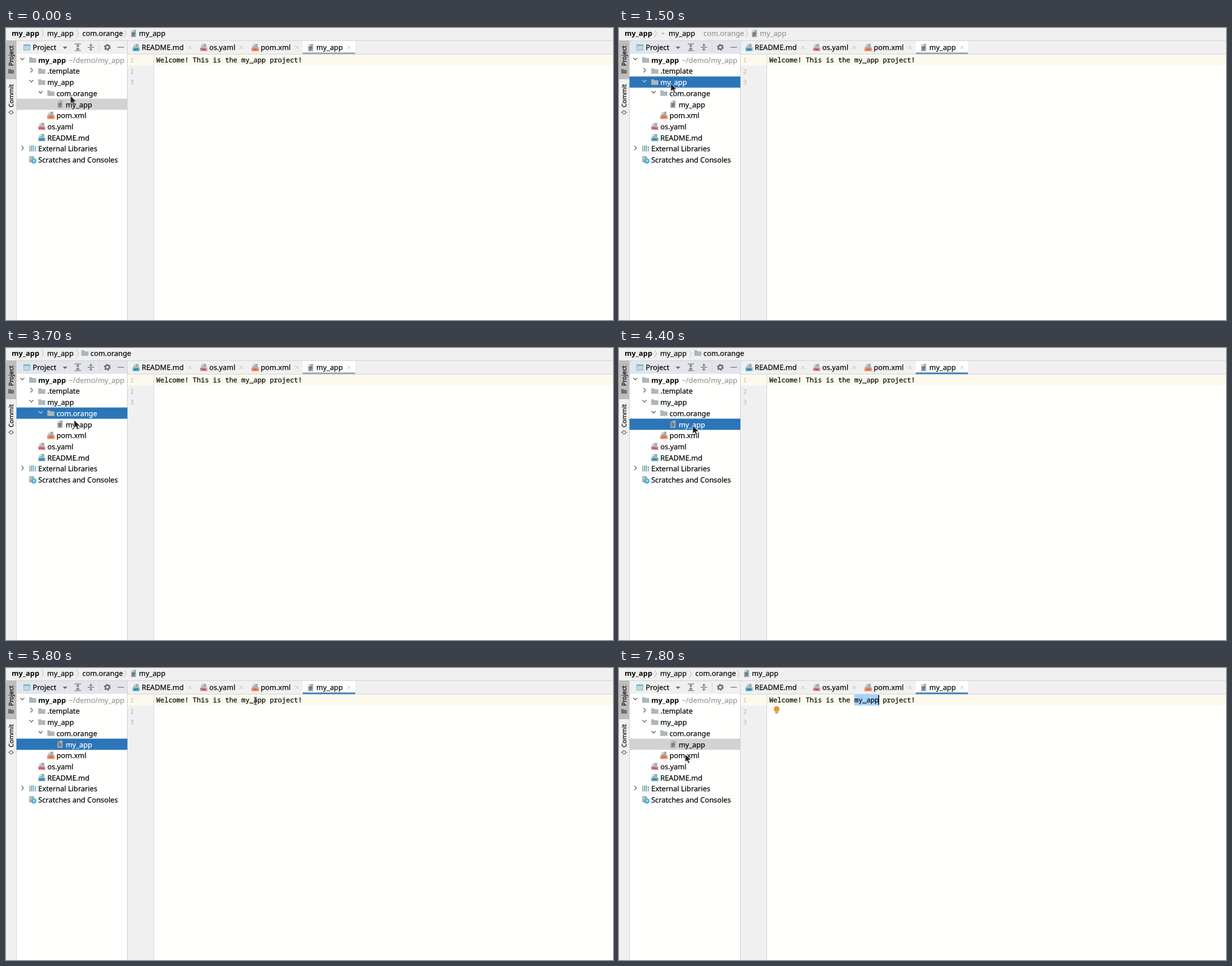
An HTML page that plays this animation: 1078 by 519 pixels, repeating every 8 s.

```html
<!DOCTYPE html>
<html lang="en">
<head>
<meta charset="utf-8">
<title>Project tree</title>
<style>
  html, body { margin: 0; width: 100%; height: 100%; overflow: hidden; background: #fff; }
  svg { display: block; width: 1078px; height: 519px; }
  text {
    font: 12.8px "Noto Sans", sans-serif; fill: currentColor; stroke: currentColor; stroke-width: .25;
    text-rendering: geometricPrecision; white-space: pre;
  }
  .bold { font-weight: 700; stroke: none; }
  .code { font: 12px "Noto Sans Mono", monospace; }
  .num { font: 10.5px "Noto Sans Mono", monospace; fill: #b0b0b0; stroke: none; }
  .side { font-size: 11.1px; }
  .tag { font-size: 5.4px; font-weight: 700; text-anchor: middle; stroke: none; }
  .line { fill: none; stroke: #6e6e6e; stroke-width: 1.2; }
  .sep { fill: none; stroke: #bcbcbc; }
</style>
</head>
<body>
<svg id="stage" viewBox="0 0 1078 519" color="#080808"></svg>
<script>
const LOOP = 8000, ROW = 19.72, BLUE = '#2b75b8', GREY = '#d2d2d2', BAR = '#f0f0f0';

const rect = (x, y, w, h, fill, extra = '') =>
  `<rect x="${x}" y="${y}" width="${w}" height="${h}" fill="${fill}" ${extra}/>`;
const text = (x, y, s, cls = '', extra = '') => `<text x="${x}" y="${y}" class="${cls}" ${extra}>${s}</text>`;
const path = (d, extra = 'class="line"') => `<path d="${d}" ${extra}/>`;
const group = (x, y, body, turn = '') => `<g transform="translate(${x} ${y}) ${turn}">${body}</g>`;

// Icons, centred on 0,0
const folder = (fill = '#adb7bd') => path('M-6.3-5h4.6l1.6 1.9h6.4v8.1h-12.6z', `fill="${fill}"`);
const page = path('M-.8-6.5h5.3v6.3h-9v-2.6h3.7z M-1.9-6.5v2.7h-2.7z', 'fill="#a3adb4"');
const badge = (label, fill, ink) => page + rect(-6.5, -.2, 13, 6.7, fill) +
  text(0, 5.1, label, 'tag', `style="fill:${ink}"`);
const icons = {
  folder: folder(),
  md: badge('MD', '#70c3dd', '#1d5266'),
  yaml: badge('YML', '#eaa9ba', '#70243c'),
  xml: badge('&lt;&gt;', '#e88f6c', '#71351c'),
  file: path('M-.8-6.5h5.3v13h-9v-9.3h3.7z M-1.9-6.5v2.7h-2.7z', 'fill="#a3adb4"') +
    path('M-2.7-.9h5.4M-2.7 1.5h5.4M-2.7 3.9h3.8', 'stroke="#47525a" stroke-width="1.2"'),
  libs: rect(-6, -5, 2, 10, '#9aa7b0') + rect(-2.8, -6, 2, 11, '#72b56b') +
    rect(.4, -6, 2, 11, '#5cb4d2') + rect(4, -4.5, 2, 9.5, '#9aa7b0'),
  scratch: path('M-6-6.5h8.5v4h-4l-1 7h-3.5z', 'fill="#a3adb4"') +
    path('M-4.3-4.4l2 1.7-2 1.7', 'fill="none" stroke="#fff"') +
    '<circle cx="2" cy="2" r="4.9" fill="#4fb5d8"/>' +
    path('M2-.8v3.2h2.4', 'fill="none" stroke="#fff" stroke-width="1.1"'),
};
const icon = (name, x, y) => group(x, y, icons[name]);

// Project tree: [depth, icon, label, arrow]
const rows = [
  [0, 'folder', 'my_app', 'open'], [1, 'folder', '.template', 'shut'], [1, 'folder', 'my_app', 'open'],
  [2, 'folder', 'com.orange', 'open'], [3, 'file', 'my_app'], [2, 'xml', 'pom.xml'],
  [1, 'yaml', 'os.yaml'], [1, 'md', 'README.md'], [0, 'libs', 'External Libraries', 'shut'],
  [0, 'scratch', 'Scratches and Consoles'],
];
const arrows = { open: 'M-3.6-2.6l3.6 3.6 3.6-3.6', shut: 'M-1.8-4.3l3.8 4-3.8 4' };
const treeRow = ([depth, kind, label, arrow], i) => {
  const x = depth * 16.2, body = icon(kind, 47.3 + x, 0) +
    text(57.3 + x, 5, label, i ? '' : 'bold') +
    (arrow ? group(29 + x, -1, path(arrows[arrow], 'fill="none" stroke="currentColor" stroke-width="1.2" opacity=".7"')) : '');
  return group(0, 56.7 + ROW * i, `<g id="row${i}">${body}</g>`);
};

const tab = (x, kind, label, textX, closeX) => icon(kind, x, 34.7) + text(textX, 39, label) +
  path(`M${closeX - 3} 31.5l6 6m0-6l-6 6`, 'stroke="#b8b8b8"');

const sep = x => path(`M${x - 2} 3.5l4 6.5-4 6.5`, 'class="sep"');
const crumb = (x, s) => text(x, 14.2, s);
const trails = {
  full: sep(65) + crumb(73, 'my_app') + sep(127) + crumb(135.5, 'com.orange') + sep(212) +
    icon('file', 226.5, 9.7) + crumb(236, 'my_app'),
  shift: sep(65) + '<circle cx="78" cy="9.7" r="1.8" fill="#adb7bd"/>' + crumb(88, 'my_app') +
    `<g color="#999">${crumb(150, 'com.orange')}${sep(227)}${icon('file', 240.5, 9.7)}${crumb(250, 'my_app')}</g>`,
  app: sep(65) + icon('folder', 78, 9) + crumb(88, 'my_app'),
  pkg: sep(65) + crumb(73, 'my_app') + sep(127) + icon('folder', 140, 9) + crumb(150, 'com.orange'),
};

const header = rect(19, 23, 196, 23, BAR, 'id="header"') +
  rect(31, 29, 12, 11, '#8db3c2') + rect(32, 32, 10, 7, '#b3def0') +
  text(47.5, 38.5, 'Project') + path('M100.7 33h8.4l-4.2 4.6z', 'fill="#6e6e6e"') +
  path('M122 28.4h11M122 40.2h11M127.5 30v8.6M124.9 32.6l2.6-2.6 2.6 2.6M124.9 36l2.6 2.6 2.6-2.6') +
  path('M145 34.3h11.5M150.7 27.5v4.6M150.7 41v-4.6M148.3 29.8l2.4 2.4 2.4-2.4M148.3 38.8l2.4-2.4 2.4 2.4') +
  path('M165.5 26v17', 'stroke="#d4d4d4"') +
  '<circle cx="180" cy="34.3" r="3.5" fill="none" stroke="#6e6e6e" stroke-width="2.4"/>' +
  '<circle cx="180" cy="34.3" r="5.2" fill="none" stroke="#6e6e6e" stroke-width="1.8" stroke-dasharray="2.7 2.745"/>' +
  path('M198 34.3h11.5');

const sideLabel = (y, s) => group(13, y, text(0, 0, s, 'side'), 'rotate(-90)');
const stripe = rect(0, 22, 18, 497, BAR) + rect(0, 22, 18, 69, '#bdbdbd') +
  sideLabel(67.5, 'Project') + group(9, 77, folder('#6e6e6e'), 'scale(.8)') + sideLabel(141, 'Commit') +
  '<circle cx="9" cy="150" r="2.8" class="line"/>' + path('M3.3 150h2.9M11.8 150h2.9') +
  rect(18, 22, 1, 497, '#d0d0d0');

const editor = rect(216, 47, 46, 472, BAR) + rect(216, 47, 862, 19.6, '#fcfaed') +
  rect(262, 47, 1, 472, '#d6d6d6') +
  [1, 2, 3].map((n, i) => text(220.5, 61 + ROW * i, n, 'num')).join('') +
  rect(418, 47, 43.2, 19.6, '#a6d2ff', 'id="mark"') +
  text(266.8, 61.3, 'Welcome! This is the my_app project!', 'code') +
  rect(460.4, 48, 1.6, 17.6, '#000', 'id="caret"') + rect(439.2, 48, 1.4, 17.6, '#000', 'id="clickCaret"') +
  `<g id="bulb"><path d="M277.4 78.3c0-1.6-2.5-2.4-2.5-5.5a5.1 5.1 0 0 1 10.2 0c0 3.1-2.5 3.9-2.5 5.5z" fill="#e6982c"/>
   ${rect(277.4, 79, 5.2, 1.4, '#7d7d7d')}</g>`;

const pointer = `<g id="pointer">
  <path id="arrow" d="M0 0v14.3l3.3-3 2.5 5.4 2.4-1.1-2.5-5.2h4.6z" fill="#1c1c1c" stroke="#fff" stroke-width=".7"/>
  <path id="beam" d="M-2.8-6.2h2l.8.8.8-.8h2M-2.8 6.2h2l.8-.8.8.8h2M0-5.4v10.8" fill="none" stroke="#222" stroke-width="1.2"/></g>`;

document.getElementById('stage').innerHTML =
  rect(0, 0, 1078, 519, '#fffffe') + rect(0, 0, 1078, 22, BAR) + rect(0, 22, 1078, 1, '#d2d2d2') +
  text(10, 14.2, 'my_app', 'bold') +
  Object.entries(trails).map(([id, body]) => `<g id="${id}">${body}</g>`).join('') +
  stripe + header + rect(215, 23, 1, 496, '#d0d0d0') +
  rect(18.6, 46.6, 197, 20, GREY, 'id="selection"') + rows.map(treeRow).join('') +
  text(111.5, 61.7, '~/demo/my_app', '', 'color="#999"') +
  rect(216, 23, 862, 23, BAR) + rect(216, 46, 862, 1, '#d4d4d4') + rect(527, 23, 93, 23, '#fff') +
  rect(527, 43.5, 93, 3, '#9ca7b8', 'id="underline"') +
  tab(231, 'md', 'README.md', 241, 326.5) + tab(351, 'yaml', 'os.yaml', 361, 418) +
  tab(442.5, 'xml', 'pom.xml', 452.5, 516.5) + tab(541, 'file', 'my_app', 551, 609) +
  editor + pointer;

// Each track holds its value from the given millisecond on
const sheet = document.createElement('style');
const track = (id, prop, steps) => {
  const frames = Object.entries(steps).map(([ms, v]) => `${ms / LOOP * 100}%{${prop}:${v}}`).join('');
  sheet.textContent += `@keyframes ${id}{${frames}}#${id}{animation:${id} ${LOOP}ms step-end infinite}\n`;
};
const at = (x, y) => `translate(${x}px,${y}px)`;
const show = (id, steps) => track(id, 'opacity', steps);
const row = (i, fill) => `${fill};transform:${at(0, ROW * i)}`;

track('selection', 'fill', { 0: row(4, GREY), 1300: row(2, BLUE), 3100: row(3, BLUE), 4400: row(4, BLUE), 6000: row(4, GREY) });
track('row2', 'color', { 0: '#080808', 1300: '#fff', 3100: '#080808' });
track('row3', 'color', { 0: '#080808', 3100: '#fff', 4400: '#080808' });
track('row4', 'color', { 0: '#080808', 4400: '#fff', 6000: '#080808' });
track('header', 'fill', { 0: BAR, 1300: '#e2e6ec', 6300: BAR });
track('underline', 'fill', { 0: '#9ca7b8', 4400: '#4280c0' });

show('full', { 0: 1, 1500: 0, 4700: 1 });
show('shift', { 0: 0, 1500: 1, 1600: 0 });
show('app', { 0: 0, 1600: 1, 3400: 0 });
show('pkg', { 0: 0, 3400: 1, 4700: 0 });

show('clickCaret', { 0: 0, 6000: 1, 6300: 0 });
show('mark', { 0: 0, 6300: 1 });
show('caret', { 0: 0, 6300: 1, 7300: 0, 7800: 1 });
show('bulb', { 0: 0, 7200: 1 });

show('arrow', { 0: 1, 4800: 0, 7200: 1 });
show('beam', { 0: 0, 4800: 1, 7200: 0 });
track('pointer', 'transform', {
  0: at(114.5, 120.5), 800: at(108, 109), 900: at(97, 95), 1100: at(92, 98.5),
  2300: at(104, 109), 2400: at(116, 120), 2600: at(117, 121.5),
  3700: at(121, 128), 3800: at(132, 149), 4000: at(132, 146), 4100: at(131.5, 141), 4200: at(131, 138),
  4700: at(165, 142), 4800: at(300, 152), 4900: at(425, 160), 5000: at(492, 148),
  5100: at(505, 122), 5200: at(482, 86), 5300: at(456, 65),
  5500: at(445, 57), 5700: at(444, 54), 5800: at(443, 58.5),
  6900: at(380, 92), 7000: at(245, 148),
  7200: at(170, 168), 7300: at(136, 171), 7400: at(121, 169),
  7600: at(119, 164), 7700: at(118, 157), 7800: at(117.5, 153),
});
document.head.append(sheet);
</script>
</body>
</html>
```
